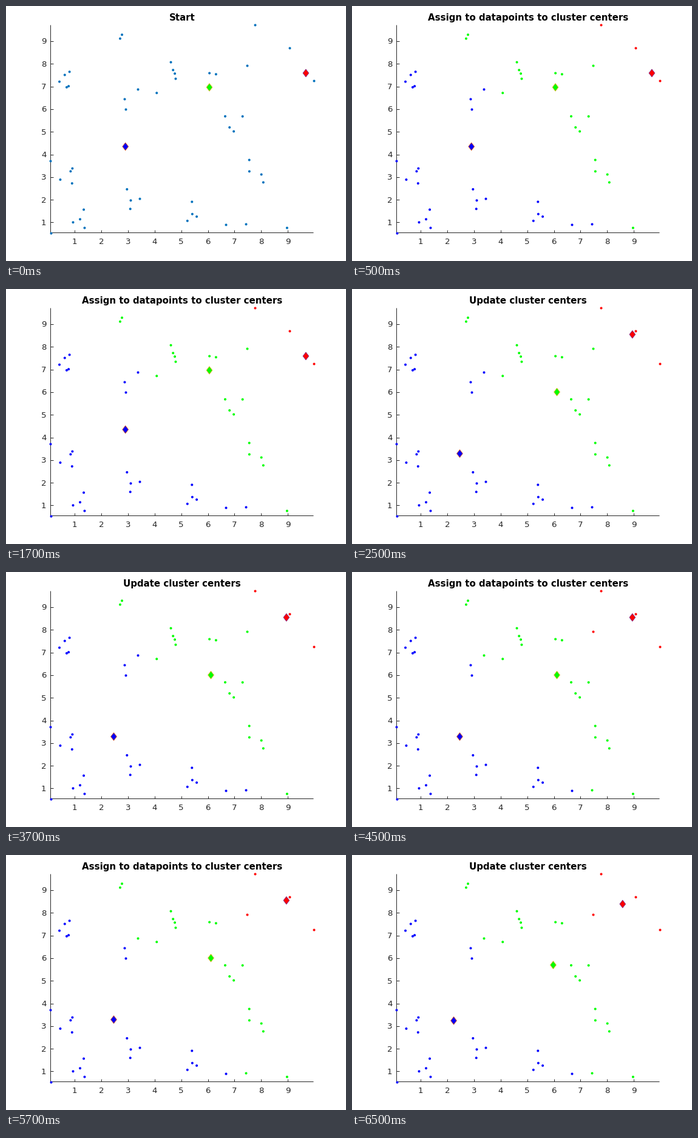
A matplotlib script that plays this animation: 560x420 px, repeating every 8 s.

```python
import numpy as np
import matplotlib.pyplot as plt
from matplotlib.animation import FuncAnimation
from matplotlib.patches import Polygon

DPI = 80
PX = 72 / DPI                      # one pixel in points
LEFT, TOP, RIGHT, BOTTOM = 72.6, 31, 505.6, 373
ORIGIN = np.array([112.4, 356])    # stage position of data value (1, 1)
UNIT = np.array([43.93, 37.33])    # pixels per data unit
INK = "#262626"
DEFAULT = (0, 0.447, 0.741)
CLUSTERS = [(0, 0, 1), (0, 1, 0), (1, 0, 0)]
EDGES = [(0.85, 0.325, 0.098), (0.929, 0.694, 0.125), (0.494, 0.184, 0.556)]
ASSIGN, UPDATE = "Assign to datapoints to cluster centers", "Update cluster centers"

# Positions are in stage pixels, y downwards.
CLUMPS = [  # x, y, number of dots
    (98, 122, 5), (103, 279, 4), (122, 353, 4), (207, 318, 4), (306, 341, 4),
    (189, 50, 2), (270, 114, 5), (340, 111, 2), (373, 192, 4), (411, 273, 4),
]
LONERS = [
    (73, 255), (74, 374), (195, 153), (197, 170), (217, 137), (362, 360),
    (395, 359), (397, 98), (462.4, 365), (410, 31), (467, 69), (507, 123),
]
START = np.array([(196.2, 231), (334.5, 133.4), (493.4, 110)])


def scatter_points(rng):
    """Lone dots plus clumps of random dots balanced around their middle."""
    groups = [np.array(LONERS, float)]
    for x, y, count in CLUMPS:
        offsets = rng.uniform(-1, 1, (count, 2)) * count * np.array([4.5, 5.5])
        group = (x, y) + offsets - offsets.mean(axis=0)
        group[:, 1] = np.minimum(group[:, 1], BOTTOM - 8)
        groups.append(group)
    return np.concatenate(groups)


def nearest(points, centers):
    gaps = (points[:, None] - centers) / UNIT
    return np.argmin((gaps ** 2).sum(axis=2), axis=1)


def kmeans_stages(points, centers, rounds):
    """List of (title, dot colours, centers), one per step."""
    stages = [("Start", [DEFAULT] * len(points), centers)]
    for _ in range(rounds):
        labels = nearest(points, centers)
        colors = [CLUSTERS[k] for k in labels]
        stages.append((ASSIGN, colors, centers))
        centers = np.array([points[labels == k].mean(axis=0) for k in range(3)])
        stages.append((UPDATE, colors, centers))
    return stages


def diamond(center):
    return center + np.array([(0, -6.4), (4.9, 0), (0, 6.4), (-4.9, 0)])


fig = plt.figure(figsize=(560 / DPI, 420 / DPI), dpi=DPI, facecolor="white")
ax = fig.add_axes([0, 0, 1, 1])
ax.set(xlim=(-0.5, 559.5), ylim=(419.5, -0.5))
ax.axis("off")


def line(xs, ys):
    ax.plot(xs, ys, color=INK, lw=PX, solid_capstyle="butt", zorder=1)


def label(x, y, text, **style):
    return ax.text(x, y, text, family="DejaVu Sans", va="baseline", **style)


line([LEFT, LEFT], [TOP, BOTTOM])
line([LEFT, RIGHT], [BOTTOM, BOTTOM])
for n in range(1, 10):
    x, y = ORIGIN + (n - 1) * UNIT * (1, -1)
    line([x, x], [BOTTOM, BOTTOM - 4.5])
    line([LEFT, LEFT + 4.5], [y, y])
    tick = dict(color=INK, size=13.33 * PX)
    label(x, 392, n, ha="center", **tick)
    label(66, y + 4.4, n, ha="right", **tick)

title = label(289.4, 24, "", ha="center", size=15 * PX, weight="bold", color="black")
points = scatter_points(np.random.default_rng(4))
dots = ax.scatter(*points.T, s=(4 * PX) ** 2, linewidths=0, zorder=2)
markers = [
    ax.add_patch(Polygon(diamond(c), facecolor=fill, edgecolor=edge,
                         lw=0.8 * PX, joinstyle="miter", zorder=3))
    for c, fill, edge in zip(START, CLUSTERS, EDGES)
]
stages = kmeans_stages(points, START, 2)


def draw(i):
    text, colors, centers = stages[(i + 3) // 4]
    title.set_text(text)
    dots.set_facecolor(colors)
    for marker, center in zip(markers, centers):
        marker.set_xy(diamond(center))
    return [title, dots, *markers]


anim = FuncAnimation(fig, draw, frames=16, interval=500, repeat=True)
plt.show()
```
